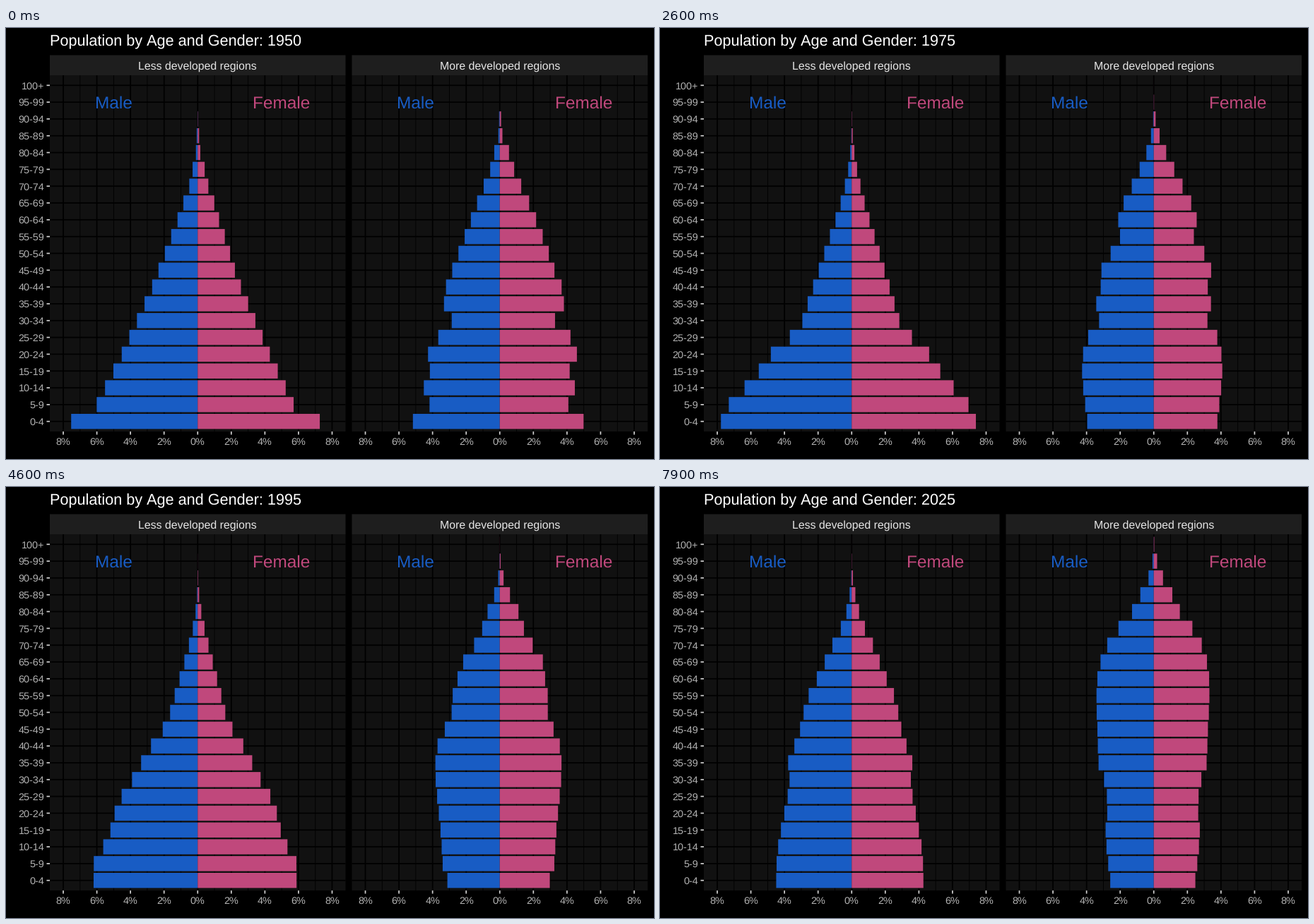
A matplotlib script that plays this animation: 917x611 px, repeating every 8 s.

```python
import numpy as np
import matplotlib.pyplot as plt
from matplotlib.animation import FuncAnimation
from matplotlib.patches import Rectangle

W, H, DPI = 917, 611, 64
FRAMES, STEP = 80, 16 / 3          # frames per five-year state
AGES, STATES = 21, 16
BLUE, PINK = "#185cc4", "#c0487c"
PANEL, STRIP = "#111111", "#1e1e1e"
TOP, BOTTOM, WIDTH = 67, 572, 418.5
UNIT = WIDTH / 17.6                # pixels per percent
ROW = (BOTTOM - TOP) / 21.2

# start: male share in percent by age group in 1950, as key points
# ratio: women per man in 1950, as key points by age group
# births: male share of the youngest group in each five-year state
# girls: girls per boy; hazard: death rate scale for men and women;
# gain: how much more the younger groups profit from falling death rates
REGIONS = [
    dict(name="Less developed regions", left=62,
         start={0: 7.53, 1: 6.01, 4: 4.52, 8: 2.71, 12: 1.2, 14: .5, 16: .105, 18: .01, 19: 0},
         ratio={0: .965, 1: .95, 9: .95, 12: 1.06, 16: 1.48},
         births=[7.53, 8.55, 8.4, 8.42, 8.35, 7.7, 7.12, 6.97,
                 6.8, 5.83, 5.58, 5.38, 5.19, 4.98, 4.72, 4.44],
         girls=.95, hazard=(1.6, 1.15), gain=.0127),
    dict(name="More developed regions", left=489.5,
         start={0: 5.17, 1: 4.18, 2: 4.52, 3: 4.16, 4: 4.27, 5: 3.66, 6: 2.86,
                7: 3.32, 8: 3.2, 13: 1.35, 15: .57, 17: .085, 19: 0},
         ratio={0: .965, 3: 1, 5: 1.15, 9: 1.15, 14: 1.33, 17: 1.85},
         births=[5.17, 5.1, 4.85, 4.52, 4.2, 3.93, 3.7, 3.55,
                 3.4, 2.95, 2.8, 2.78, 2.88, 2.78, 2.68, 2.57],
         girls=.955, hazard=(1.06, .8), gain=.003),
]


def curve(points):
    return np.interp(np.arange(AGES), list(points), list(points.values()))


def project(region):
    """Shares by state, sex and age: cohorts grow older and thin out."""
    men = curve(region["start"])
    states = [np.array([men, men * curve(region["ratio"])])]
    age = np.arange(AGES - 1)
    for k in range(1, STATES):
        better = (.055 + region["gain"] * (15 - age)) * (14 - k)
        risk = np.outer(region["hazard"], np.exp(.5 * (age - 17.5) + better))
        older = states[-1][:, :-1] * np.exp(-risk)
        young = region["births"][k] * np.array([[1], [region["girls"]]])
        older *= (100 - young.sum()) / older.sum()
        states.append(np.hstack([young, older]))
    return np.array(states) * UNIT


plt.rcParams.update({"font.family": "Liberation Sans", "text.hinting": "none",
                     "text.kerning_factor": 6})
fig = plt.figure(figsize=(W / DPI, H / DPI), dpi=DPI, facecolor="black")
ax = fig.add_axes([0, 0, 1, 1])
ax.set(xlim=(0, W), ylim=(H, 0))
ax.axis("off")


def pt(px):
    return px * 72 / DPI


def box(x, y, w, h, color, z=1):
    return ax.add_patch(Rectangle((x, y), w, h, fc=color, lw=0, snap=False, zorder=z))


def line(x, y, color="black", width=1.74):
    ax.plot(x, y, color=color, lw=pt(width), snap=False, zorder=2, solid_capstyle="butt")


def label(x, y, s, size, color, ha="center"):
    return ax.text(x, y, s, size=pt(size), color=color, ha=ha, va="baseline", zorder=5)


def row_y(a):
    return BOTTOM - (a + .6) * ROW


def build(region):
    """Draw one panel and return its bars, men first."""
    left = region["left"]
    mid = left + WIDTH / 2
    box(left, 38.5, WIDTH, TOP - 38.5, STRIP)
    box(left, TOP, WIDTH, BOTTOM - TOP, PANEL)
    label(mid, 58.8, region["name"], 15.9, "#e5e5e5")
    for p in range(-8, 9):
        x = mid + p * UNIT
        line([x, x], [TOP, BOTTOM], width=.87 if p % 2 else 1.74)
        if p % 2 == 0:
            line([x, x], [BOTTOM, BOTTOM + 4.5], "#cccccc")
            label(x, 591.3, f"{abs(p)}%", 14.4, "#b2b2b2")
    for a in range(AGES):
        line([left, left + WIDTH], [row_y(a)] * 2)
    label(mid - 5 * UNIT, 113.9, "Male", 24.4, BLUE)
    label(mid + 5 * UNIT, 113.9, "Female", 24.4, PINK)
    return [[box(mid, row_y(a) - .45 * ROW, 0, .9 * ROW, c, 3) for a in range(AGES)]
            for c in (BLUE, PINK)]


title = label(62, 25.2, "", 21.6, "white", "left")
panels = [(build(r), project(r)) for r in REGIONS]
for a in range(AGES):
    y = row_y(a)
    line([57.5, 62], [y, y], "#cccccc")
    label(54.3, y + 5.2, "100+" if a == 20 else f"{5 * a}-{5 * a + 4}", 14.4, "#b2b2b2", "right")


def draw(i):
    pos = i / STEP
    k = int(pos)
    f = pos - k
    title.set_text(f"Population by Age and Gender: {1950 + 5 * int(pos + .5)}")
    for bars, states in panels:
        now = (1 - f) * states[k] + f * states[k + 1]
        for side, lengths, sign in zip(bars, now, (-1, 1)):
            for bar, length in zip(side, lengths):
                bar.set_width(sign * length)
    return []


anim = FuncAnimation(fig, draw, frames=FRAMES, interval=100, repeat=True, repeat_delay=0)
plt.show()
```
